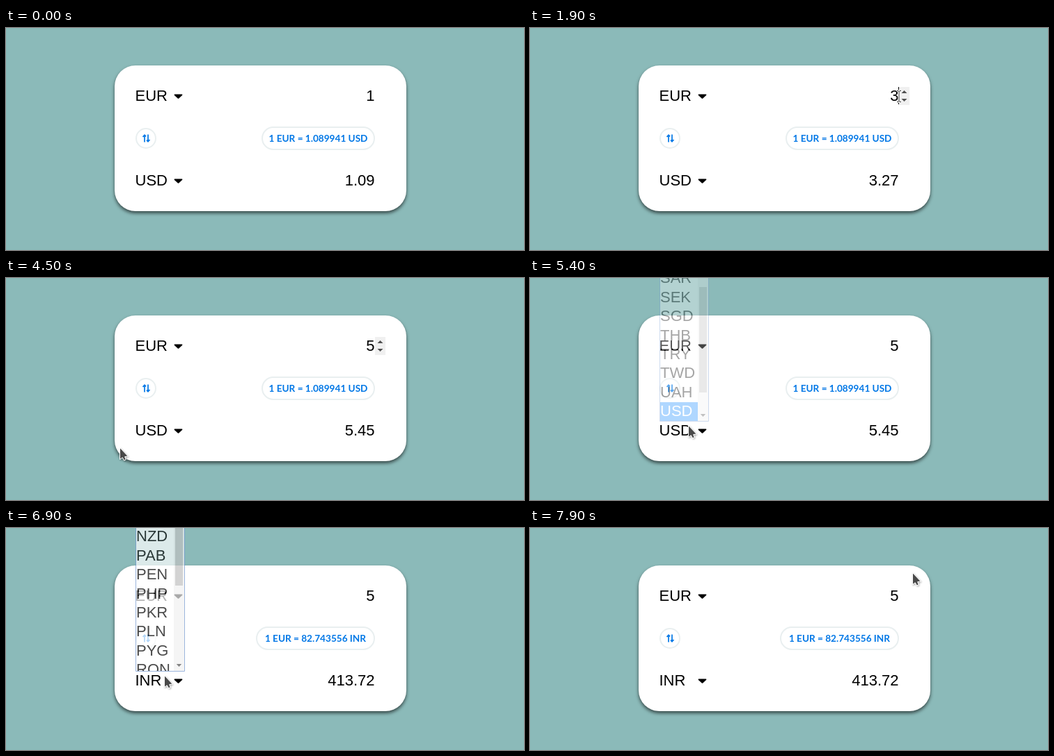
Recreate the animation shown at these times as an HTML page. Size 744 px wide and 320 px high, loop 8 s.

```html
<!DOCTYPE html>
<html lang="en">
<head>
<meta charset="utf-8">
<title>Currency converter</title>
<style>
  html, body { margin: 0; width: 100%; height: 100%; overflow: hidden; background: #8bbab9; }
  #stage { position: relative; width: 744px; height: 320px; overflow: hidden; }
  #card { position: absolute; left: 156px; top: 54px; width: 419px; height: 210px;
    border-radius: 30px; background: #fff; box-shadow: 0 3px 5px rgba(0, 0, 0, .6); }
  svg { position: absolute; left: 0; top: 0; display: block; }
  text { font: 22px "Liberation Sans", Arial, sans-serif; white-space: pre; }
  .end { text-anchor: end; }
  #rate { font: 700 13.6px Lato, sans-serif; fill: #0077e6; text-anchor: middle; }
  .ring { fill: #fff; stroke: #e9eff0; stroke-width: 2; }
</style>
</head>
<body>
<div id="stage">
  <div id="card"></div>
  <svg width="744" height="320" viewBox="0 0 744 320">
    <defs>
      <path id="drop" d="M.8 0H11.2Q12.6.2 11.6 1.4L6.8 6Q6 6.6 5.2 6L.4 1.4Q-.6.2.8 0Z"/>
      <clipPath id="view"><path d="M187 0H256V206H187Z"/></clipPath>
      <filter id="soft" x="-50%" y="-50%" width="200%" height="200%">
        <feDropShadow dx=".8" dy="1.2" stdDeviation=".9" flood-opacity=".35"/>
      </filter>
    </defs>

    <text x="185.5" y="105">EUR</text>
    <use href="#drop" x="241.5" y="95.5"/>
    <text id="target" x="185.5" y="227"></text>
    <use href="#drop" x="241.5" y="217.5"/>

    <circle class="ring" cx="201" cy="159" r="14"/>
    <path d="M199 164.5V154.5M196.5 157 199 154.2 201 156.4M204 153.5V163.5M202 161.6 204 163.8 206.5 161"
      fill="none" stroke="#0077e6" stroke-width="1.7"/>
    <rect id="pill" class="ring" y="143" height="32" rx="16"/>
    <text id="rate" y="164"></text>

    <text id="amount" class="end" x="529.5" y="105"></text>
    <text id="result" class="end" x="529.5" y="227"></text>

    <g id="spinner">
      <path d="M530 85H545V111H530Z" fill="#f0f0f0"/>
      <path id="hover" d="M530 98H545V111H530Z" fill="#d0d3d2"/>
      <path d="M533.5 94 537.5 90 541.5 94ZM533.5 102H541.5L537.5 106Z" fill="#4f4f4f"/>
    </g>
    <path id="caret" d="M529 85H530V110H529Z"/>

    <g id="popup">
      <path d="M186.5 -9V206.5H256.5V-9Z" fill="#fff" stroke="#7297d0"/>
      <path d="M241 0H256V206H241Z" fill="#f1f1f1"/>
      <rect id="thumb" x="243" width="11" height="152" fill="#c1c1c1"/>
      <path d="M244.8 196H252.2L248.5 200Z" fill="#505050"/>
      <path id="mark" d="M187 179H241V206H187Z" fill="#1e90ff"/>
      <g id="rows" clip-path="url(#view)"></g>
    </g>

    <g id="beam" fill="none">
      <path d="M526.5 90.5H533.5M530 91V107M526.5 106.5H533.5" stroke="#fff" stroke-width="2.6"/>
      <path d="M527 90.5H529L530 91.5 531 90.5H533M530 91V106M527 106.5H529L530 105.5 531 106.5H533"
        stroke="#333"/>
    </g>
    <path id="arrow" d="M.5.5V17.5L4.3 14.8 6.6 19 9.2 17.8 7.7 13.6 12.3 13Z"
      fill="#4a4a4a" stroke="#fff" stroke-width="1" filter="url(#soft)"/>
  </svg>
</div>
<script>
const LOOP = 8000, STEP = 100, PITCH = 27.42;
const $ = id => document.getElementById(id);
const show = (id, on) => $(id).style.display = on ? "" : "none";
const within = (t, a, b) => t >= a && t < b;

// Pointer stops: time, x, y
const path = [
  [200, 587, 228], [700, 538, 99], [900, 530, 98], [4100, 530, 98],
  [4500, 163, 244], [4900, 227, 212], [7000, 227, 212],
  [7700, 542, 121], [7900, 549, 64]
];
const lists = ["SAR SEK SGD THB TRY TWD UAH USD", "NZD PAB PEN PHP PKR PLN PYG RON"]
  .map(s => s.split(" "));

function pointer(t) {
  const i = path.findIndex(p => p[0] >= t);
  if (i < 1) return path[i < 0 ? path.length - 1 : 0].slice(1);
  const [a, b] = [path[i - 1], path[i]], k = (t - a[0]) / (b[0] - a[0]);
  return [1, 2].map(n => a[n] + (b[n] - a[n]) * k);
}

function popupOpacity(t) {
  if (within(t, 5400, 5600)) return t < 5500 ? .35 : .7;
  if (within(t, 5600, 6900)) return 1;
  return within(t, 6900, 7100) ? (t < 7000 ? .7 : .3) : 0;
}

let scrolled;
function fillRows(next) {
  if (next === scrolled) return;
  scrolled = next;
  const last = next ? 211.2 : 199.3;
  $("rows").innerHTML = lists[+next].map((code, i) =>
    `<text x="187" y="${last - (7 - i) * PITCH}" fill="${code === "USD" ? "#fff" : "#000"}">${code}</text>`
  ).join("");
  $("thumb").setAttribute("y", next ? -69 : 13);
  show("mark", !next);
}

function draw(now) {
  const t = Math.floor(now % LOOP / STEP) * STEP;
  const amount = 1 + [1600, 1900, 2400, 3700].filter(s => t >= s).length;
  const inr = t >= 6900, rate = inr ? 82.743556 : 1.089941, left = inr ? 360 : 368;

  $("amount").textContent = amount;
  $("result").textContent = (amount * rate).toFixed(2);
  $("rate").textContent = `1 EUR = ${rate} ${inr ? "INR" : "USD"}`;
  $("rate").setAttribute("x", (left + 529) / 2);
  $("pill").setAttribute("x", left);
  $("pill").setAttribute("width", 529 - left);
  $("target").textContent = t < 5900 ? "USD" : t < 6200 ? "IDR" : "INR";

  show("spinner", within(t, 700, 5400));
  show("hover", within(t, 700, 900));
  show("caret", within(t, 1200, 3100) || within(t, 3700, 4200));

  fillRows(t >= 5900);
  const opacity = popupOpacity(t);
  show("popup", opacity > 0);
  $("popup").setAttribute("opacity", opacity);

  const beam = within(t, 900, 4200);
  show("beam", beam);
  show("arrow", t >= 200 && !beam);
  $("arrow").setAttribute("transform", `translate(${pointer(t)})`);
}

const start = performance.now();
function tick() {
  draw(performance.now() - start);
  requestAnimationFrame(tick);
}
tick();
</script>
</body>
</html>
```
